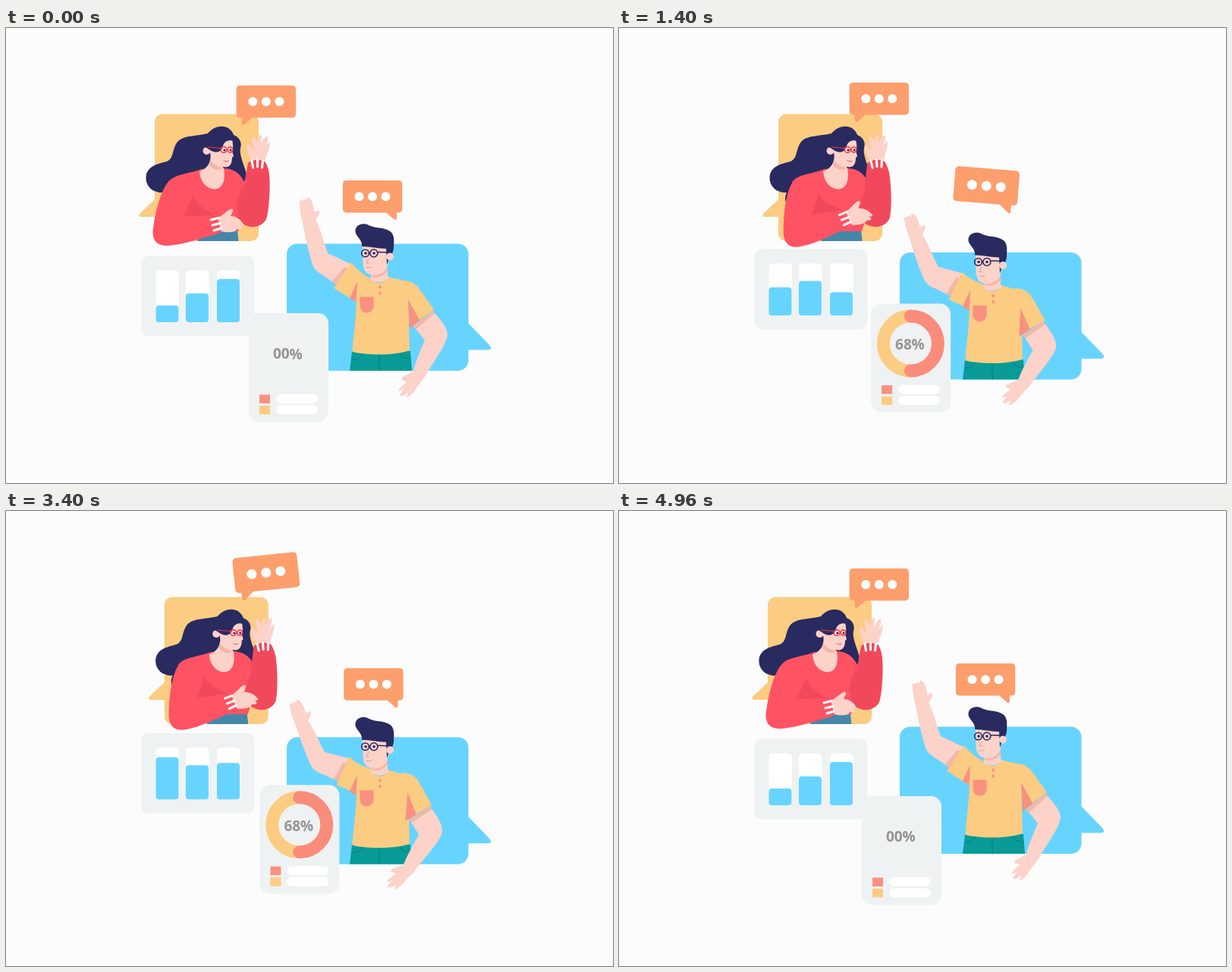
Animation, 800 px wide and 600 px high, one loop 5 s. Source, as an HTML page:

```html
<!DOCTYPE html>
<html lang="en">
<head>
<meta charset="utf-8">
<title>Video chat</title>
<style>
html, body { margin: 0; width: 100%; height: 100%; overflow: hidden; background: #fcfcfc; }
svg { display: block; width: 100vw; height: 100vh; }
.skin { fill: #fcd2c9; }
.shade { fill: #f2b7aa; }
.hair { fill: #292a60; }
.red { fill: #ff5363; }
.deep { fill: #f1495b; }
.sun { fill: #fbcc82; }
.coral { fill: #fa9080; }
.blue { fill: #67d4ff; }
.card { fill: #eff2f2; }
.white { fill: #fff; }
.line { fill: none; stroke-linecap: round; }
.ring { fill: none; stroke-width: 17; stroke-linecap: round; }
text { font: 700 19px "Open Sans", "Noto Sans", sans-serif; fill: #949494; }
</style>
</head>
<body>
<svg viewBox="0 0 800 600">
  <defs>
    <clipPath id="window"><rect x="20" y="41.5" width="36" height="24"/></clipPath>
    <g id="bubble">
      <path fill="#fd9e6d" d="M-34-21.3H34Q39.2-21.3 39.2-16V16Q39.2 21.2 34 21.2H-18L-29 30.5Q-32 32-32 28V21.2H-34Q-39.2 21.2-39.2 16V-16Q-39.2-21.3-34-21.3Z"/>
      <g class="white"><circle cx="-17.5" r="6"/><circle r="6"/><circle cx="17.5" r="6"/></g>
    </g>
  </defs>

  <g id="woman">
    <rect class="sun" x="196" y="113.5" width="137" height="167.5" rx="10"/>
    <path class="sun" d="M197 225L176 245Q174 249 178 249H197Z"/>
    <path class="hair" d="M266 139C277 126 295 127 300 141C309 145 311 152 309 158C307 168 314 180 318 196L312 206L250 190L222 245C206 238 202 226 207 217C190 217 184 206 184.500 196C186 182 200 179 212 176C222 171 218 161 226 150C234 141 250 143 266 139Z"/>
    <path fill="#4587a8" d="M257 267H305L306.500 281H252Z"/>
    <path class="red" d="M257 186C240 193 222 192 214 203L238 258L260 268H306C312 250 318 225 314 203C308 190 298 185 286 185Z"/>
    <path class="skin" d="M269 162C272 178 264 186 255 189C256 203 264 212 275 212.500C285 212 290 202 287 185L284 180Z"/>
    <path class="shade" d="M269 174C275 182 281 184 287 184C281 189 274 188 268 181Z"/>
    <path class="skin" d="M266 152L298 147C300 156 299 160 298.500 164L300 169L298 171C298 179 295 183.500 289 183.500C282 183 275 178 270 168Z"/>
    <circle class="skin" cx="264.500" cy="162" r="5"/>
    <path class="hair" d="M262 157C263 141 278 130 289 134C297 136 300 142 300 149C293 147 288 150 286 155C284 163 279 165 273 163C269 162 266 158 262 157Z"/>
    <g class="line" stroke="#ed3348" stroke-width="1.5">
      <path stroke-width="1" d="M266 157L283 158.500"/>
      <circle cx="287" cy="160.500" r="4"/><circle cx="295.500" cy="160.500" r="3.500"/>
    </g>
    <g class="hair"><circle cx="288" cy="161" r="1.500"/><circle cx="296" cy="161" r="1.400"/></g>
    <path class="line" stroke="#c9675f" d="M287 175Q290 177 293 175.500"/>
    <path class="deep" d="M313 203L303 235L309 251Z"/>
    <g id="raisedArm">
      <path class="skin" d="M323 177C321 168 315 157 318 153C321 153 324 160 326 162C326 155 322 146 325 143C328 142 330 148 332 152C331 147 333 141 336 141C338 142 336 148 336 152C338 148 343 141 345 143C347 145 343 153 342 156C344 153 348 149 348 152C348 160 342 168 341 177Z"/>
      <path class="deep" d="M319 178C324 173 337 173 342 177C346 184 347.500 193 347.500 202C348 220 346 243 343 252C338 262 325 264 318 261C308 258 304 250 306 243C311 233 313 215 314 205Z"/>
      <path class="line" stroke="#fff" stroke-width="3" stroke-linecap="butt" d="M324 175L325.500 184M331.500 174V183M338.500 175L337.500 184"/>
    </g>
    <g id="foldedArm">
      <path class="red" d="M213 204C222 193 238 194 247 206L240 246L272 248L280 271C258 277 235 286 213 287C201 287.500 193 282 193.500 268C196 245 204 215 213 204Z"/>
      <path class="deep" d="M247 220L234 248L276 247C262 240 250 232 247 220Z"/>
      <path class="skin" d="M279 250C286 247 292 240 297 238.500C302 239 297 245 296 248C303 248 310 253 313 259C314 262 310 261 308 260C314 265 309 267 304 265C304 270 292 270 283 268Z"/>
      <path class="red" d="M268 248L278 247L284 269L274 273Z"/>
      <path class="line" stroke="#fff" stroke-width="3" stroke-linecap="butt" d="M270 253L280 250.500M272 260L282 257.500M274 267L283.500 264"/>
    </g>
  </g>

  <g id="bars">
    <rect class="card" x="178.500" y="300.500" width="149" height="106" rx="10"/>
  </g>

  <g id="man">
    <rect class="blue" x="370" y="284.500" width="239.500" height="167.500" rx="14"/>
    <path class="blue" d="M609 389L637 418Q642 424 635 424.500H609Z"/>
    <g id="waveArm">
      <path class="skin" d="M408 305L424 297L454 311L435 338L410 321Q404 313 408 305Z"/>
      <path class="shade" d="M430 334L446 315L452 318L436 340Z"/>
      <path id="forearm" class="skin" d="M425 299C419 285 415 265 408 253C411 249 414 244 413 241C411 239 408 244 406 242C406 235 403 226 399 224C396 223 396 226 396 228C394 225 391 225 391 228C388 226 386 228 387 232C387 240 389 248 391 256C394 275 400 300 404 312C407 321 414 324 418 318Z"/>
      <path class="sun" d="M455 309L432 343L461 361L482 331C472 326 461 318 455 309Z"/>
    </g>
    <path fill="#089b97" d="M456 426H533L535 452H453Z"/>
    <path class="line" stroke="#067b80" d="M492 430V452M457 437Q466 438 469 430M533 436Q523 437 520 430"/>
    <path class="sun" d="M479 330L464 325L458 345L462 360C461 390 457 410 456.500 427C475 432 515 432 532 425C531 400 531 375 530 360L541 342C530 332 515 332 504 328C500 338 486 338 479 330Z"/>
    <path class="coral" d="M463 334L453 356L461.500 361Z"/>
    <path class="coral" d="M466.500 354.500H484.500V367C483 378 468 379 466.500 367Z"/>
    <g class="coral"><circle cx="493" cy="341.500" r="2"/><circle cx="493" cy="349.500" r="2"/></g>
    <g id="lowArm">
      <path class="skin" d="M537 393L562 373C572 384 580 392 582 403C582 415 568 433 552 460C547 467 542 472 539 478C536 482 530 488 528 487L530 480C526 484 521 487 519 484L525 475C519 480 516 479 519 475C524 470 528 468 527 466L521 464C521 459 530 458 537 452C540 440 546 425 552 412Z"/>
      <path class="shade" d="M536 394L562 373L565 376L541 397Z"/>
      <path class="coral" d="M530 358L547 384L532 396Z"/>
      <path class="sun" d="M520 333C537 332 542 340 549 350L564 371L545 385L530 358Z"/>
    </g>
    <path class="skin" d="M481 316H503V327C508 329 500 335 491 335C484 335 479 332 481 329Z"/>
    <path class="shade" d="M482 324C491 327 499 321 503 315V320C497 328 489 330 482 328Z"/>
    <path class="skin" d="M470 286H503V314C500 321 494 326 485 326C475 325 471 320 470.500 310Z"/>
    <path class="hair" d="M461 271C458 261 468 256 476 259C485 265 498 262 506 268C513 273 511 282 511 290C510 298 507 300 505 302L502 312L501 291C490 291 480 288 469 288C470 281 464 277 461 271Z"/>
    <circle class="skin" cx="506" cy="301.500" r="5"/>
    <g class="line" stroke="#292a60" stroke-width="1.600">
      <circle cx="473.500" cy="297" r="4.800"/><circle cx="484.800" cy="297" r="5"/>
      <path d="M490 295.500L504 296"/>
    </g>
    <g class="hair"><circle cx="474" cy="297" r="1.800"/><circle cx="485" cy="297" r="1.800"/></g>
    <path class="line" stroke="#dc9b90" d="M478 304L475 310H478M475 316Q479 317 482 315"/>
  </g>

  <g id="gauge">
    <rect class="card" width="105" height="143.500" rx="14"/>
    <path id="sunArc" class="ring" stroke="#fbcc82"/>
    <path id="coralArc" class="ring" stroke="#fa8c7c"/>
    <g clip-path="url(#window)"><g id="digits"></g></g>
    <text x="53.500" y="60.500">%</text>
    <rect class="coral" x="14" y="107.500" width="14" height="11.500"/>
    <rect class="sun" x="14" y="122" width="14" height="11.500"/>
    <rect class="white" x="36" y="107" width="55" height="12" rx="6"/>
    <rect class="white" x="36" y="121.500" width="55" height="12" rx="6"/>
  </g>

  <g id="chat1"><use href="#bubble"/></g>
  <g id="chat2"><g transform="scale(-1 1)"><use href="#bubble"/></g></g>
</svg>
<script>
const LOOP = 5000, ROW = 20, BAR_BASE = 388;
const $ = id => document.getElementById(id);

function add(parent, name, attrs, content = '') {
  const node = document.createElementNS('http://www.w3.org/2000/svg', name);
  for (const key in attrs) node.setAttribute(key, attrs[key]);
  node.textContent = content;
  return parent.appendChild(node);
}

const place = (id, value) => $(id).setAttribute('transform', value);

// Eased value of a [time, value] key list
function track(t, keys) {
  const next = keys.findIndex(k => k[0] > t);
  if (next < 0) return keys[keys.length - 1][1];
  if (next === 0) return keys[0][1];
  const [t0, a] = keys[next - 1], [t1, b] = keys[next];
  const u = (t - t0) / (t1 - t0);
  return a + (b - a) * u * u * (3 - 2 * u);
}

const barKeys = [
  [[560, 22], [2400, 56], [3300, 56], [4700, 22]],
  [[560, 38], [1500, 45.5], [2760, 47], [3400, 45], [4320, 38]],
  [[0, 57], [1700, 28], [2200, 28], [4100, 57]]
];
const bars = barKeys.map((keys, i) => {
  const x = [197.5, 237, 278][i];
  add($('bars'), 'rect', { class: 'white', x, y: 319.5, width: 30.5, height: 68.5, rx: 5 });
  return add($('bars'), 'rect', { class: 'blue', x, width: 30, rx: 4 });
});

['00', '11', '23', '34', '45', '56', '68'].forEach((value, i) =>
  add($('digits'), 'text', { x: 32, y: 60.5 + i * ROW }, value));

function drawArc(id, from, to) {
  const point = deg => {
    const a = deg * Math.PI / 180;
    return `${52.3 + 36 * Math.sin(a)} ${52.5 - 36 * Math.cos(a)}`;
  };
  $(id).setAttribute('d', to - from > 0.5 ? `M${point(from)}A36 36 0 0 1 ${point(to)}` : '');
}

function draw(t) {
  const drift = track(t, [[0, 0], [2500, 1], [5000, 0]]);
  const lean = track(t, [[0, 0], [2100, 1], [2400, 1], [5000, 0]]);
  const bob = track(t % 2500, [[0, 0], [1250, 1], [2500, 0]]);

  place('woman', `translate(${19 * lean} 0)`);
  place('foldedArm', `rotate(${-11 * lean} 228 205)`);
  place('raisedArm', `rotate(${-6 * lean} 325 255)`);

  place('man', `translate(0 ${19.5 * drift})`);
  place('waveArm', `rotate(${-15 * drift} 460 326)`);
  place('forearm', `rotate(${4 * drift} 415 308)`);
  place('lowArm', `rotate(${10 * drift} 535 350)`);

  place('bars', `translate(0 ${-9.5 * bob})`);
  bars.forEach((bar, i) => {
    const height = track(t, barKeys[i]);
    bar.setAttribute('y', BAR_BASE - height);
    bar.setAttribute('height', height);
  });

  place('gauge', `translate(${320 + 20.5 * drift} ${376 - 21 * drift})`);
  const head = track(t, [[0, 0], [1310, 360]]);
  const tail = track(t, [[3530, 0], [4700, 360]]);
  drawArc('coralArc', tail, Math.min(head, 180));
  drawArc('sunArc', Math.max(tail, 180), head);
  const row = track(t, [[0, 0], [1170, 6], [3400, 6], [4395, 0]]);
  place('digits', `translate(0 ${-ROW * row})`);

  const y1 = track(t, [[0, 97], [2300, 91.5], [2760, 98.5], [3550, 79.5], [4320, 93.5], [5000, 97]]);
  const turn1 = track(t, [[2350, 0], [2760, 7], [3400, -6], [3950, 0]]);
  const size1 = track(t, [[2350, 1], [2760, 0.92], [3400, 1.09], [4000, 1]]);
  place('chat1', `translate(342.8 ${y1}) rotate(${turn1}) scale(${size1})`);

  const y2 = track(t, [[0, 222.2], [560, 224.5], [1350, 208], [2200, 231], [2600, 230.7], [5000, 222.2]]);
  const turn2 = track(t, [[150, 0], [560, -4.5], [1300, 5], [1900, 0]]);
  const size2 = track(t, [[150, 1], [560, 0.93], [1300, 1.09], [1900, 1]]);
  place('chat2', `translate(${483 + 2 * drift} ${y2}) rotate(${turn2}) scale(${size2})`);
}

const start = performance.now();
function frame() {
  draw((performance.now() - start) % LOOP);
  requestAnimationFrame(frame);
}
frame();
</script>
</body>
</html>
```
